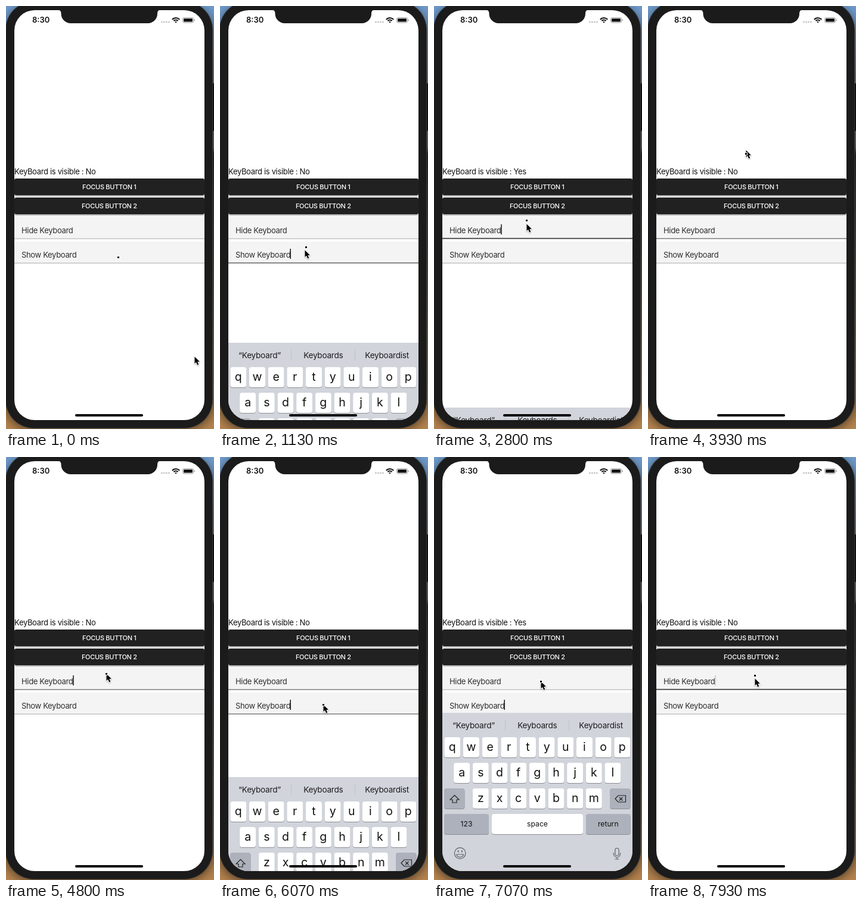
Recreate the animation shown at these times as an HTML page with a canvas. Size 349 by 711 pixels, loop 8 s.

```html
<!DOCTYPE html>
<html lang="en">
<head>
<meta charset="utf-8">
<title>Keyboard demo</title>
<style>
html, body { margin: 0; width: 100%; height: 100%; overflow: hidden; background: #1b1b1b; }
canvas { display: block; width: 349px; height: 711px; }
</style>
</head>
<body>
<canvas id="stage" width="349" height="711"></canvas>
<script>
const ctx = document.getElementById('stage').getContext('2d');
const LOOP = 8000, TICK = 200 / 3, LEAD = 70;
const CENTER = 173.3, KEYBOARD_TOP = 430, KEYBOARD_HEIGHT = 267;
const KEY = { width: 27, height: 34, pitch: 31.67, firstRow: 41, rowStep: 43 };

// Keyboard: slides in, slides out.
const KEYBOARD_SPANS = [[1040, 2573], [5960, 7290]];
const HIDE_FOCUS = [[2470, 3930], [4800, 6070], [7400, LOOP]];
const SHOW_FOCUS = [[1100, 2470], [6070, 7400]];

const POINTER_START = { x: 316, y: 589 };
const POINTER_MOVES = [
  { from: 0, to: 130, x: 86, y: 289 },
  { from: 270, to: 730, x: 141, y: 412 },
  { from: 1070, to: 1540, x: 155, y: 374 },
  { from: 2470, to: 2600, x: 155, y: 367 },
  { from: 2770, to: 3470, x: 164, y: 242 },
  { from: 3930, to: 4470, x: 168, y: 364 },
  { from: 5270, to: 5530, x: 173, y: 416 },
  { from: 6470, to: 7070, x: 179, y: 377 },
  { from: 7860, to: LOOP, x: 179, y: 367 }
];

const clamp = v => Math.max(0, Math.min(1, v));
const mix = (a, b, p) => a + (b - a) * p;
const smooth = p => p * p * (3 - 2 * p);

const recordedTime = t => Math.round(Math.floor((t + 4) / TICK) * TICK / 10) * 10;

function pointerAt(t) {
  let { x, y } = POINTER_START;
  for (const move of POINTER_MOVES) {
    const p = smooth(clamp((t - move.from) / (move.to - move.from)));
    x = mix(x, move.x, p);
    y = mix(y, move.y, p);
  }
  return [Math.round(x), Math.round(y)];
}

// Critically damped spring, as used by the system keyboard.
function spring(ms) {
  if (ms <= 0) return 0;
  const x = ms * 0.01826, rest = (1 + x) * Math.exp(-x);
  return rest < 0.003 ? 1 : 1 - rest;
}

function keyboardY(t) {
  const shown = KEYBOARD_SPANS.reduce((sum, [on, off]) => sum + spring(t - on) - spring(t - off), 0);
  return KEYBOARD_TOP + Math.round((1 - shown) * KEYBOARD_HEIGHT);
}

// The label reacts only when the slide has finished.
const keyboardReported = t => KEYBOARD_SPANS.some(([on, off]) => t >= on + 490 && t < off + 430);

function focusLevel(spans, t) {
  const ramp = start => t >= start ? clamp((t - start + 100) / 200) : 0;
  return spans.reduce((level, [on, off]) => level + ramp(on) - ramp(off), 0);
}

function caretAlpha(spans, t) {
  const span = spans.find(([on, off]) => t >= on && t < off);
  if (!span) return 0;
  const phase = (t - span[0]) % 1000;
  return phase < 700 ? clamp((550 - phase) / 100) : clamp((phase - 870) / 130);
}

function box(x, y, w, h, radius, color) {
  ctx.fillStyle = color;
  ctx.beginPath();
  ctx.roundRect(x, y, w, h, radius);
  ctx.fill();
}

function text(str, x, y, size, color, { align = 'left', weight = 400, spacing = 0 } = {}) {
  ctx.font = `${weight} ${size}px Inter, "Noto Sans", sans-serif`;
  ctx.letterSpacing = spacing + 'px';
  ctx.textAlign = align;
  ctx.fillStyle = color;
  ctx.fillText(str, x, y);
}

function shadow(color, blur, offsetY) {
  ctx.shadowColor = color;
  ctx.shadowBlur = blur;
  ctx.shadowOffsetY = offsetY;
}

function stroke(color, width, path) {
  ctx.strokeStyle = color;
  ctx.lineWidth = width;
  path ? ctx.stroke(path) : ctx.stroke();
}

function arc(x, y, r, from, to, color, width) {
  ctx.beginPath();
  ctx.arc(x, y, r, from, to);
  stroke(color, width);
}

function drawPhone() {
  const wall = ctx.createLinearGradient(0, 0, 0, 711);
  wall.addColorStop(0, '#6f9aca');
  wall.addColorStop(0.335, '#5d6b78');
  wall.addColorStop(0.35, '#33281f');
  wall.addColorStop(1, '#b4834f');
  ctx.fillStyle = wall;
  ctx.fillRect(0, 0, 349, 711);
  box(345, 130, 4, 80, 1, '#141414');
  ctx.save();
  shadow('rgba(0,0,0,.5)', 16, 4);
  box(-1, -8, 348, 718, 48, '#333');
  ctx.restore();
  box(0, -7, 346, 716, 47, '#1b1b1b');
}

function drawNotch() {
  ctx.fillStyle = '#1b1b1b';
  ctx.beginPath();
  ctx.moveTo(86, 6);
  ctx.arcTo(92.5, 6, 92.5, 14, 6);
  ctx.arcTo(92.5, 29, 110, 29, 16);
  ctx.arcTo(254, 29, 254, 14, 16);
  ctx.arcTo(254, 6, 261, 6, 6);
  ctx.lineTo(261, 6);
  ctx.fill();
}

function drawStatus() {
  const ink = '#111', left = -Math.PI * 0.76, right = -Math.PI * 0.24;
  text('8:30', 44, 28, 13, ink, { weight: 600 });
  for (let i = 0; i < 4; i++) box(260 + i * 4, 25.5, 2.8, 2.8, 1, '#c6c6c6');
  for (let r = 1.5; r < 9; r += 3.5) arc(285, 28.5, r, left, right, ink, 2.1);
  ctx.beginPath();
  ctx.roundRect(296.5, 19.5, 18, 8.5, 2.5);
  stroke('#999', 1);
  box(298, 21, 15, 5.5, 1.2, ink);
  box(315.5, 22.3, 1.3, 3, 0.6, '#999');
}

function drawButton(label, y) {
  ctx.save();
  shadow('rgba(0,0,0,.45)', 3, 1.5);
  box(14, y, 319, 28, 3, '#212121');
  ctx.restore();
  text(label, CENTER, y + 18, 11, '#fff', { align: 'center', weight: 500, spacing: -0.3 });
}

function drawField(label, top, caretX, spans, t) {
  const level = focusLevel(spans, t), shade = mix(168, 66, level), line = 1 + 0.8 * level;
  box(14, top, 319, 36, [3, 3, 0, 0], '#f4f4f4');
  text(label, 26, top + 26.5, 13, '#2e2e2e', { spacing: -0.33 });
  ctx.fillStyle = `rgb(${shade},${shade},${shade})`;
  ctx.fillRect(14, top + 36.6 - line, 319, line);
  ctx.globalAlpha = caretAlpha(spans, t);
  ctx.fillStyle = '#222';
  ctx.fillRect(caretX, top + 12, 1.6, 17);
  ctx.globalAlpha = 1;
}

function drawKey(label, x, row, width, { color = '#fff', size = 19.5, baseline = 23 } = {}) {
  const y = KEY.firstRow + row * KEY.rowStep;
  box(x, y + 1, width, KEY.height, 4, '#8b8e95');
  box(x, y, width, KEY.height, 4, color);
  text(label, x + width / 2, y + baseline, size, '#111', { align: 'center' });
}

function drawLetters(letters, row) {
  const rowWidth = (letters.length - 1) * KEY.pitch + KEY.width;
  [...letters].forEach((letter, i) =>
    drawKey(letter, CENTER - rowWidth / 2 + i * KEY.pitch, row, KEY.width));
}

function drawKeyboardIcons() {
  stroke('#222', 1.2, new Path2D('M34.5 138.5l7.5 7.5h-4v5h-7v-5h-4z'));
  stroke('#222', 1.2, new Path2D('M304 144.5l5-5.5h12.5v11H309zM311 142l5.5 5.5m0-5.5l-5.5 5.5'));

  const ink = '#5d6066';
  arc(43.7, 236, 9.3, 0, 7, ink, 1.2);
  stroke(ink, 1.1, new Path2D('M38 238h11.4a5.7 4.6 0 0 1-11.4 0z'));
  box(39.7, 231, 1.8, 3.4, 1, ink);
  box(46, 231, 1.8, 3.4, 1, ink);
  ctx.beginPath();
  ctx.roundRect(303.8, 227.5, 6.4, 12.5, 3.2);
  stroke(ink, 1.2);
  stroke(ink, 1.1, new Path2D('M301.3 235v2a5.7 5.7 0 0 0 11.4 0v-2M307 242.7v3.3m-3.5 0h7'));
}

function drawKeyboard(y) {
  const words = ['“Keyboard”', 'Keyboards', 'Keyboardist'];
  const grey = { color: '#adb1bb', size: 12.2, baseline: 21.3 };
  ctx.save();
  ctx.translate(0, y);
  box(14, 0, 319, KEYBOARD_HEIGHT + 2, 0, '#d1d4db');
  words.forEach((word, i) => {
    text(word, 66.5 + i * 106.8, 25.5, 13.6, '#1c1c1e', { align: 'center', spacing: -0.25 });
    if (i) box(12 + i * 107, 12, 1, 18, 0, '#bfc2c9');
  });
  ['qwertyuiop', 'asdfghjkl', 'zxcvbnm'].forEach(drawLetters);
  drawKey('', 17, 2, 34.5, grey);
  drawKey('', 295, 2, 34.5, grey);
  drawKey('123', 17, 3, 75, grey);
  drawKey('space', 97, 3, 153, { ...grey, color: '#fff' });
  drawKey('return', 255, 3, 74.5, grey);
  drawKeyboardIcons();
  ctx.restore();
}

function drawPointer(t) {
  const [x, y] = pointerAt(t), [dotX, dotY] = pointerAt(t + LEAD);
  const arrow = new Path2D('M0 0v11.6l2.6-2.4 2.1 4.8 2.1-.9-2-4.6 3.6-.2z');
  ctx.save();
  ctx.translate(x + 0.5, y + 0.5);
  ctx.lineJoin = 'round';
  shadow('rgba(0,0,0,.3)', 2, 1);
  stroke('#fff', 1.8, arrow);
  shadow('transparent', 0, 0);
  ctx.fillStyle = '#000';
  ctx.fill(arrow);
  ctx.restore();
  box(dotX - 2, dotY - 2, 5, 5, 0, '#fff');
  box(dotX - 1, dotY - 1, 3, 3, 0, '#000');
}

function draw(t) {
  const y = keyboardY(t), answer = keyboardReported(t) ? 'Yes' : 'No';
  drawPhone();
  ctx.save();
  ctx.beginPath();
  ctx.roundRect(14, 7, 319, 689, 34);
  ctx.fillStyle = '#fff';
  ctx.fill();
  ctx.clip();
  text('KeyBoard is visible : ' + answer, 14, 282.5, 13, '#111', { spacing: -0.33 });
  drawButton('FOCUS BUTTON 1', 290);
  drawButton('FOCUS BUTTON 2', 322);
  drawField('Hide Keyboard', 355, 112.2, HIDE_FOCUS, t);
  drawField('Show Keyboard', 396, 117.4, SHOW_FOCUS, t);
  if (y < KEYBOARD_TOP + KEYBOARD_HEIGHT) drawKeyboard(y);
  box(116, 686, 114, 4, 2, '#000');
  ctx.restore();
  drawNotch();
  drawStatus();
  drawPointer(t);
}

function frame() {
  draw(recordedTime(performance.now() % LOOP));
  requestAnimationFrame(frame);
}
frame();
</script>
</body>
</html>
```
